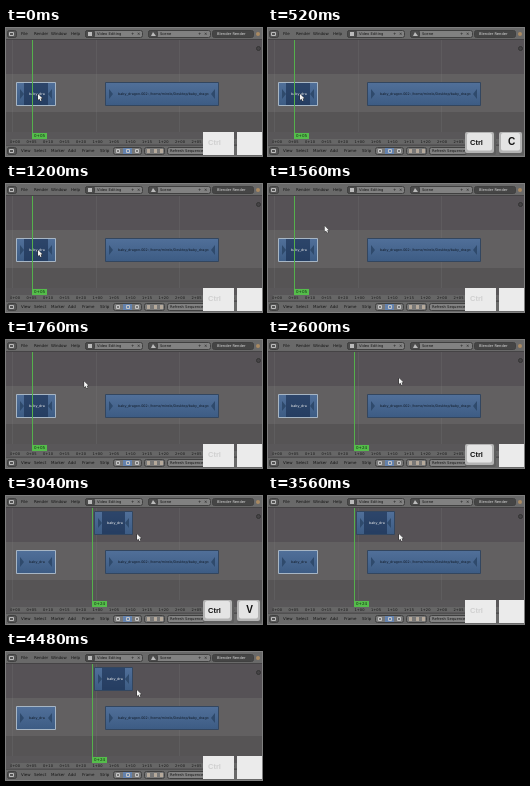
An HTML page with a canvas for the animation above (4520 ms loop, 256 by 128 pixels).

```html
<!DOCTYPE html>
<html lang="en">
<meta charset="utf-8">
<title>Copy and paste a strip</title>
<style>
  html, body { margin: 0; width: 100%; height: 100%; overflow: hidden; background: #575457; }
  canvas { display: block; width: 256px; height: 128px; }
</style>
<canvas width="256" height="128"></canvas>
<script>
const ctx = document.querySelector('canvas').getContext('2d');
const LOOP = 4520;
const COPY = { label: 'C', modifier: 240, letter: 360, release: 760 };
const PASTE = { label: 'V', modifier: 2600, letter: 2720, release: 3360 };
const FADE = 200;
const SEEK = 1880;
const SANS = '"DejaVu Sans", sans-serif';
const KEYCAP = '"Liberation Sans", Arial, sans-serif';

const progress = (t, from, to) => Math.max(0, Math.min(1, (t - from) / (to - from)));
const mix = (a, b, p) => a + (b - a) * p;

function rect(x, y, w, h, color) {
  ctx.fillStyle = color;
  ctx.fillRect(x, y, w, h);
}

function round(x, y, w, h, r, fill, stroke) {
  ctx.beginPath();
  ctx.roundRect(x, y, w, h, r);
  if (fill) { ctx.fillStyle = fill; ctx.fill(); }
  if (stroke) { ctx.strokeStyle = stroke; ctx.lineWidth = 1; ctx.stroke(); }
}

function poly(points, fill, stroke) {
  ctx.beginPath();
  points.forEach(([x, y]) => ctx.lineTo(x, y));
  ctx.closePath();
  if (stroke) { ctx.strokeStyle = stroke; ctx.lineWidth = 1; ctx.stroke(); }
  ctx.fillStyle = fill;
  ctx.fill();
}

function text(s, x, y, size = 4, color = '#151515', align = 'left', font = SANS, weight = '') {
  ctx.font = `${weight} ${size}px ${font}`;
  ctx.textAlign = align;
  ctx.textBaseline = 'middle';
  ctx.fillStyle = color;
  ctx.fillText(s, x, y);
}

function button(x, y, w, fill, label, labelX, color) {
  round(x + .5, y + .5, w, 7, 2, fill, '#404040');
  if (label) text(label, labelX, y + 4, 3.7, color);
}

function grid() {
  rect(0, 0, 256, 128, '#565256');
  rect(0, 46, 256, 38, '#626061');
  rect(0, 84, 256, 20, '#565455');
  for (const x of [6, 90, 173]) rect(x, 12, 1, 92, 'rgba(130,130,130,.2)');
  round(250.5, 18.5, 4, 4, 2, '#454345', '#333');
}

function editorIcon(y) {
  button(1, y, 9, '#555');
  round(3.5, y + 2.5, 4, 3, 0, null, '#bbb');
}

function header() {
  rect(0, 0, 256, 11, '#696969');
  rect(0, 11, 256, 1, '#454345');
  editorIcon(2);
  [['File', 15], ['Render', 28], ['Window', 45], ['Help', 65]].forEach(([s, x]) => text(s, x, 6));
  button(79, 2, 57, '#818181', 'Video Editing', 91);
  button(79, 2, 9, '#4c4c4c');
  rect(82, 4, 4, 4, '#bbb');
  text('+', 125, 6);
  text('×', 131, 6);
  button(142, 2, 62, '#818181', 'Scene', 154);
  button(142, 2, 9, '#4c4c4c');
  poly([[145, 8], [147, 4], [150, 8]], '#bbb');
  text('+', 192, 6);
  text('×', 198, 6);
  button(206, 2, 41, '#454545', 'Blender Render', 211, '#d8d8d8');
  ctx.beginPath();
  ctx.arc(252, 6, 2, 0, 7);
  ctx.fillStyle = '#a98a62';
  ctx.fill();
}

function footer() {
  rect(0, 117, 256, 11, '#696969');
  rect(0, 117, 256, 1, '#505050');
  editorIcon(119);
  [['View', 15], ['Select', 28], ['Marker', 45], ['Add', 62], ['Frame', 76], ['Strip', 94]]
    .forEach(([s, x]) => text(s, x, 123));
  button(107, 119, 28, '#777');
  rect(117, 120, 9, 6, '#6482ad');
  for (const x of [110, 120, 129]) round(x + .5, 121.5, 3, 3, 0, null, '#c5c5c5');
  button(138, 119, 20, '#777');
  for (const x of [141, 148, 154]) rect(x, 121, 3, 4, '#b5a99b');
  button(161, 119, 40, '#818181', 'Refresh Sequencer', 164);
}

function ruler() {
  rect(0, 104, 256, 13, '#595759');
  round(4, 111, 246, 5, 2.5, '#666');
  for (let i = 0; i < 15; i++) {
    const frame = i * 5, seconds = Math.floor(frame / 25);
    text(`${seconds}+${String(frame % 25).padStart(2, '0')}`, 9 + i * 16.5, 113.7, 3.6, '#151515', 'center');
  }
}

function strip(x, y, w, label, { selected = false, active = false } = {}) {
  const shade = ctx.createLinearGradient(0, y, 0, y + 23);
  shade.addColorStop(0, '#51709a');
  shade.addColorStop(1, '#3d5c84');
  round(x + .5, y + .5, w - 1, 23, 0, shade, active ? '#a6b5c4' : '#33465f');
  if (selected) rect(x + 8, y + 1, w - 16, 22, 'rgba(22,42,76,.6)');
  poly([[x + 4, y + 7], [x + 8, y + 12], [x + 4, y + 17]], '#2f4a6c');
  poly([[x + w - 4, y + 7], [x + w - 8, y + 12], [x + w - 4, y + 17]], '#2f4a6c');
  text(label, x + 13, y + 12, 3.4, selected ? '#f0f0f0' : '#111a26');
}

function playhead(x, label) {
  rect(x, 12, 1, 99, '#55b04c');
  rect(x, 105, 15, 6, '#55bd4b');
  text(label, x + 7.5, 108.2, 4, '#102b10', 'center');
}

function key(x, w, label, size, labelX, pressed, rest) {
  const top = 104;
  ctx.globalAlpha = 1 - pressed;
  rect(x, top, w, 23, '#ebebeb');
  ctx.globalAlpha = pressed;
  round(x, top, w, 23, 2, '#5e5e5e');
  round(x, top, w - 2, 21, 2, '#b4b4b4');
  round(x + 2, top + 1, w - 6, 17.5, 2, '#e4e4e4');
  ctx.globalAlpha = Math.max(pressed, rest);
  text(label, labelX, top + 10.5, size, '#111', 'center', KEYCAP, 'bold');
  ctx.globalAlpha = 1;
}

// An arc up to the ruler position, a short rest, then a straight move aside.
function pointer(t) {
  const p = progress(t, 1320, 1840), q = progress(t, 2000, 2200);
  const arc = (a, b, c) => mix(mix(a, b, p), mix(b, c, p), p);
  const x = mix(arc(32, 58, 87), 131, q);
  const y = mix(arc(66, 26, 46), 38, q);
  const arrow = [[0, 0], [0, 6], [1.4, 4.8], [2.4, 7], [3.5, 6.5], [2.5, 4.4], [4.3, 4.3]];
  poly(arrow.map(([dx, dy]) => [x + dx, y + dy]), '#f4f4f4', '#2b2b2b');
}

const level = (t, down, release) => t < down ? 0 : 1 - progress(t, release, release + FADE);

function draw(now) {
  const t = Math.floor((now % LOOP) / 40) * 40;
  const moved = t >= SEEK, pasted = t >= PASTE.letter;
  const combo = t < PASTE.modifier ? COPY : PASTE;
  grid();
  strip(10, 54, 40, 'baby_dra', { selected: !pasted, active: true });
  strip(99, 54, 114, 'baby_dragon.002: /home/mirelo/Desktop/baby_drago');
  if (pasted) strip(88, 15, 39, 'baby_dra', { selected: true });
  ruler();
  playhead(moved ? 86 : 26, moved ? '0+24' : '0+05');
  header();
  footer();
  pointer(t);
  key(197, 31, 'Ctrl', 7.5, 208.5, level(t, combo.modifier, combo.release), .12);
  key(231, 25, combo.label, 10, 243.5, level(t, combo.letter, combo.release), 0);
}

const start = performance.now();
function tick() {
  draw(performance.now() - start);
  requestAnimationFrame(tick);
}
tick();
</script>
</html>
```
